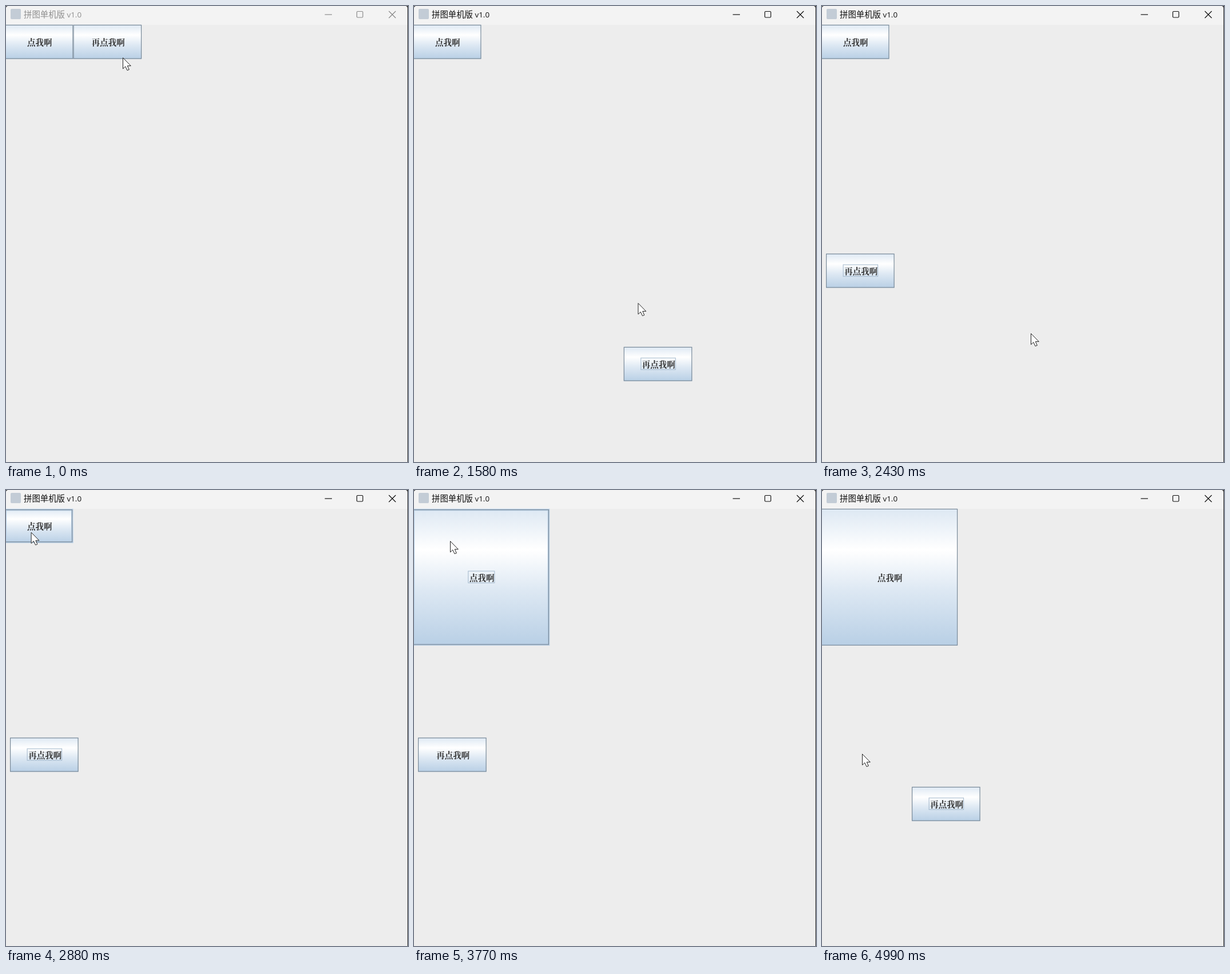
Write an HTML page that moves like this. It is 703 px wide and 797 px high and loops after 5030 ms.

```html
<!DOCTYPE html>
<html lang="zh-CN">
<head>
<meta charset="utf-8">
<title>拼图单机版</title>
<style>
  html, body { margin: 0; width: 100%; height: 100%; overflow: hidden; background: #ededed; }
  svg { display: block; width: 703px; height: 797px; }
  .title { font: 14.4px "Noto Sans CJK SC", "Noto Sans CJK", sans-serif; }
  .version { font: 13.4px "Open Sans", "Noto Sans", sans-serif; }
  .label { font: bold 14.5px "Noto Serif CJK SC", "Noto Sans CJK SC", "Noto Sans CJK", serif; fill: #333; text-anchor: middle; }
</style>
</head>
<body>
<svg viewBox="0 0 703 797" xmlns="http://www.w3.org/2000/svg">
  <defs>
    <linearGradient id="steel" x1="0" y1="0" x2="0" y2="1">
      <stop offset="0" stop-color="#dde8f3"/>
      <stop offset=".3" stop-color="#fff"/>
      <stop offset=".6" stop-color="#dde8f3"/>
      <stop offset="1" stop-color="#b8cfe5"/>
    </linearGradient>
  </defs>
  <rect width="703" height="797" fill="#ededed"/>
  <rect width="703" height="33" fill="#f3f3f3"/>
  <path d="M0 0H3Q.5 .5 0 3ZM703 0H699Q702 .5 702 4V797H703Z" fill="#333"/>
  <rect x="8" y="5" width="18" height="18" rx="2" fill="#c3ccd6"/>
  <g id="caption">
    <text class="title" x="31" y="20">拼图单机版</text>
    <text class="version" x="106.5" y="20">v1.0</text>
  </g>
  <g id="controls" fill="none" stroke-width="1.2">
    <path d="M557.5 15H570"/>
    <rect x="613.5" y="9.5" width="10.5" height="10.5" rx="1.5"/>
    <path d="M669.5 9L681.5 21M681.5 9L669.5 21"/>
  </g>
  <g id="buttons"></g>
  <path id="cursor" d="M0 0V19.2L4.3 15.2L7.5 22L10.8 20.7L7.8 14.1H13.8Z" fill="#fff" stroke="#222" stroke-linejoin="round"/>
</svg>
<script>
const LOOP = 5030;
const DARK = '#7a8a99', LIGHT = '#b8cfe5';
const $ = id => document.getElementById(id);

// time, x, y
const path = [
  [40, 204, 90], [300, 194, 75],
  [1220, 194, 75], [1380, 288, 296], [1580, 391.5, 519], [1740, 404, 594], [1860, 406, 605],
  [2390, 406, 605], [2430, 365, 572], [2640, 160, 262], [2820, 55, 88], [2920, 36, 64],
  [3570, 36, 64], [3770, 63, 89], [4090, 85, 245], [4280, 80, 385], [4460, 70, 461]
];

const within = (t, a, b) => t >= a && t < b;

function cursorAt(t) {
  if (t <= path[0][0]) return path[0].slice(1);
  const i = path.findIndex(p => p[0] > t);
  if (i < 0) return path[path.length - 1].slice(1);
  const [t0, x0, y0] = path[i - 1], [t1, x1, y1] = path[i];
  const k = (t - t0) / (t1 - t0);
  return [x0 + (x1 - x0) * k, y0 + (y1 - y0) * k];
}

const frame = (x, y, w, h, inset, color) =>
  `<rect x="${x + inset + .6}" y="${y + inset + .6}" width="${w - 2 * inset - 1.2}" ` +
  `height="${h - 2 * inset - 1.2}" fill="none" stroke="${color}" stroke-width="1.2"/>`;

function button({ x, y, w, h, label, pressed, hover, focus }) {
  const cx = x + w / 2, cy = y + h / 2;
  let out = `<rect x="${x}" y="${y}" width="${w}" height="${h}" fill="${pressed ? LIGHT : 'url(#steel)'}"/>`;
  if (pressed) {
    out += frame(x, y, w, h, 0, DARK) +
      `<path d="M${x} ${y + 1.6}H${x + w}" stroke="${DARK}" stroke-width="1.2"/>`;
  } else if (hover) {
    out += frame(x, y, w, h, 0, LIGHT) + frame(x, y, w, h, 2.4, LIGHT) + frame(x, y, w, h, 1.2, DARK);
  } else {
    out += frame(x, y, w, h, 0, DARK);
  }
  if (focus) {
    const fw = label.length * 14.5 + 2.5;
    out += `<rect x="${cx - fw / 2 + .5}" y="${cy - 10.5}" width="${fw}" height="20.5" fill="none" stroke="#a3b8cc"/>`;
  }
  return out + `<text class="label" x="${cx + 1.3}" y="${cy + 6.6}">${label}</text>`;
}

function render(t) {
  const active = t >= 450, big = t >= 3290;
  const [x, y] = t < 610 ? [117.5, 32.8] : t < 2190 ? [366.7, 595.8] : t < 4870 ? [7, 432.8] : [157, 518.8];
  $('caption').setAttribute('fill', active ? '#111' : '#8f8f8f');
  $('controls').setAttribute('stroke', active ? '#111' : '#8a8a8a');
  $('buttons').innerHTML = button({
    x: -2.5, y: 32.8, w: big ? 239.7 : 120, h: big ? 239 : 59.7, label: '点我啊',
    pressed: within(t, 3080, 3290), hover: within(t, 2830, 4140), focus: within(t, 3080, 4740)
  }) + button({
    x, y, w: 119.7, h: 59.7, label: '再点我啊',
    pressed: within(t, 450, 610) || within(t, 2060, 2190) || within(t, 4740, 4870),
    hover: within(t, 80, 610) || within(t, 1780, 2190) || within(t, 4380, 4870),
    focus: within(t, 450, 3080) || t >= 4740
  });
  const [cx, cy] = cursorAt(t);
  $('cursor').setAttribute('transform', `translate(${cx + .5} ${cy + .5})`);
}

let start;
function tick(now) {
  start ??= now;
  render((now - start) % LOOP);
  requestAnimationFrame(tick);
}
render(0);
requestAnimationFrame(tick);
</script>
</body>
</html>
```
